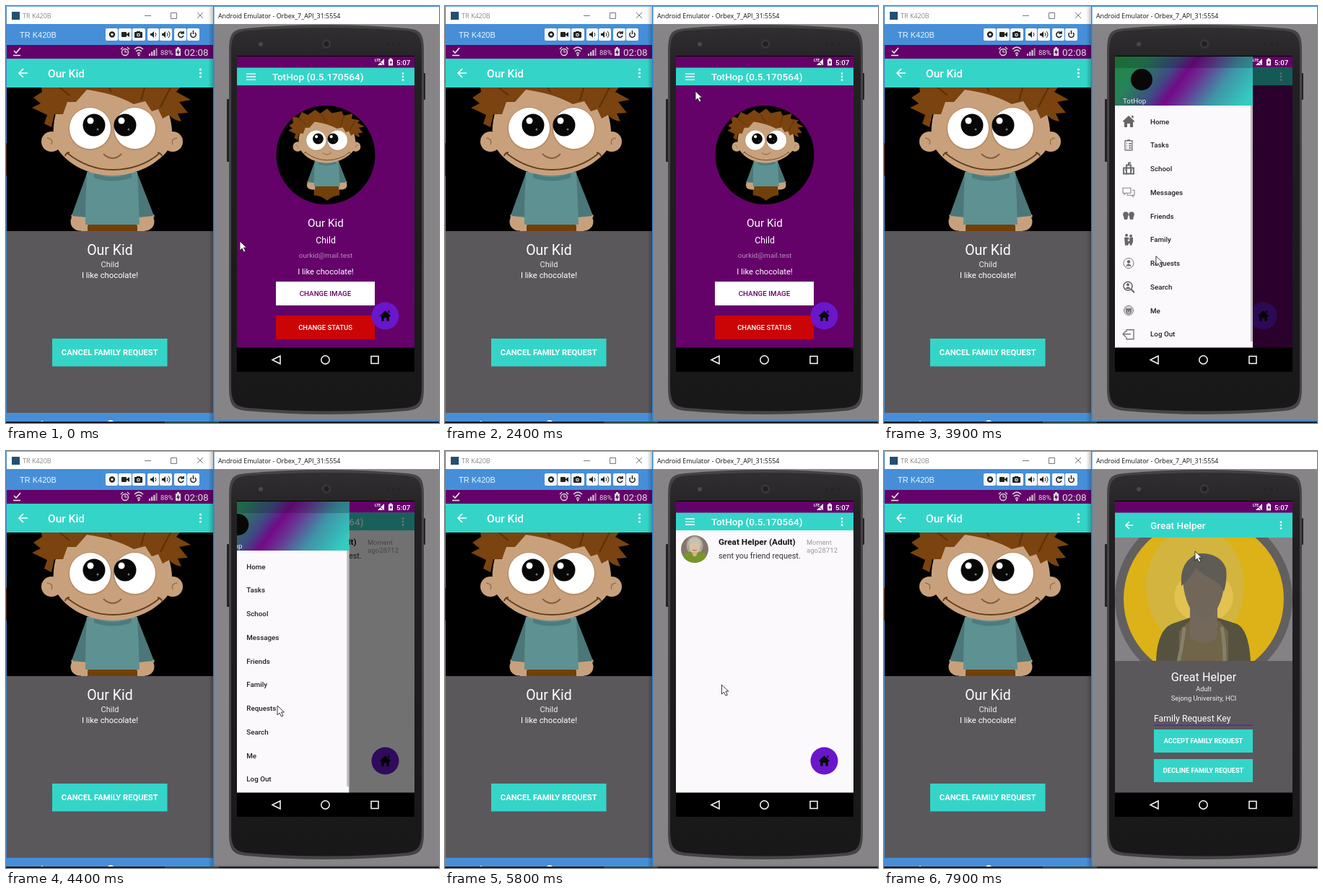
An HTML page that plays this animation: 600x578 px, repeating every 8000 ms.

```html
<!DOCTYPE html>
<html lang="en">
<head>
<meta charset="utf-8">
<title>Family request</title>
<style>
html, body { margin: 0; width: 100%; height: 100%; overflow: hidden; background: #878487; }
svg { display: block; width: 600px; height: 578px; }
text { font-family: Roboto, "Open Sans", sans-serif; white-space: pre; }
.win { font-family: "Open Sans", "Noto Sans", sans-serif; }
.ln { fill: none; stroke-linecap: butt; }
</style>
</head>
<body>
<svg id="stage" viewBox="0 0 600 578"></svg>
<script>
const TEAL = '#34d5c8', PURPLE = '#640269', GREY = '#5b585c', PAPER = '#fbf9fc';
const KID = 'Our Kid', PARENT = 'Great Helper', APP = 'TotHop';

const rect = (x, y, w, h, fill, more = '') => `<rect x="${x}" y="${y}" width="${w}" height="${h}" fill="${fill}" ${more}/>`;
const disc = (x, y, r, fill, more = '') => `<circle cx="${x}" cy="${y}" r="${r}" fill="${fill}" ${more}/>`;
const oval = (x, y, rx, ry, fill) => `<ellipse cx="${x}" cy="${y}" rx="${rx}" ry="${ry}" fill="${fill}"/>`;
const area = (d, fill, more = '') => `<path d="${d}" fill="${fill}" ${more}/>`;
const line = (d, color, w = 1) => `<path class="ln" d="${d}" stroke="${color}" stroke-width="${w}"/>`;
const label = (s, x, y, size, fill = '#fff', more = '') => `<text x="${x}" y="${y}" font-size="${size}" fill="${fill}" ${more}>${s}</text>`;
const MID = 'text-anchor="middle"', MED = 'font-weight="500"', BOLD = 'font-weight="700"';
const group = (body, more = '') => `<g ${more}>${body}</g>`;
const at = (x, y, body) => group(body, `transform="translate(${x} ${y})"`);
const dots = (x, y, gap, r) => [-gap, 0, gap].map(d => disc(x, y + d, r, '#fff')).join('');
const button = (x, y, w, h, s, size, fill = TEAL, ink = '#fff', weight = BOLD) =>
  rect(x, y, w, h, fill) + label(s, x + w / 2, y + h / 2 + size * .36, size, ink, MID + ' ' + weight);
const back = (x, y, s) => line(`M${x + 6 * s} ${y}H${x - 5 * s}M${x} ${y - 6 * s}l${-6 * s} ${6 * s}l${6 * s} ${6 * s}`, '#fff', 1.7 * s);

function child() {
  const skin = '#c8a17c', hair = '#7a430f', ink = '#070707';
  const eye = (x, px) => disc(x, 170, 30, '#b58c67') + disc(x, 169.5, 28.5, '#fff') +
    disc(px, 165, 15.5, ink) + disc(px - 5, 159, 4.5, '#fff') + disc(px + 5, 171, 1.5, '#777');
  return rect(-5, 60, 300, 300, '#000') +
    area('M110 302H184V329Q168 328 148 344Q128 328 110 329Z', '#714009') +
    area('M112 232L90 293L112 300ZM182 232L206 293L184 300Z', '#4a777a') +
    disc(102, 299, 12.5, skin) + disc(193, 299, 12.5, skin) +
    area('M90 290L113 281V312H104ZM182 281L206 290L192 312H182Z', skin) +
    area('M112 234L92 291L113 293ZM182 234L204 291L183 293Z', '#4b7779') +
    area('M112 230H182Q184 270 185 303H110Q110 270 112 230Z', '#5e9192') +
    area('M122 231Q147 243 174 231V238Q147 247 122 238Z', '#4d7b7e') +
    disc(63, 188, 14, skin) + disc(231, 188, 14, skin) +
    line('M57 183q9 1 6 9M237 183q-9 1-6 9', '#97714f', 1.5) +
    area('M92 105C67 135 61 172 69 194C84 221 117 235 147 235C179 235 211 220 228 195C234 172 228 135 200 105Z', skin) +
    area('M38 127L50 119L46 98L66 105L75 87L92 96L114 81L128 92L148 78L162 91L190 85L196 98L222 92L219 107L242 112L236 119L256 130L240 133L252 148L238 149L243 160Q231 158 226 151L217 156L211 143L202 146L193 132L177 136Q150 121 112 116L97 133L85 133L79 150L67 150L63 168L53 163L57 151L36 141L48 135Z', hair) +
    line('M66 106l22 18M132 94l14 25M196 100l-9 31M228 113l-14 27', '#5b3008', 2) +
    eye(116.5, 122) + eye(178.5, 165) +
    line('M135 205Q148 217 160 205', '#85603f', 2) +
    line('M85 204Q114 227 148 227Q186 227 213 204M82 208q1-5 6-5M210 203q5 1 6 5', '#62401f', 1.8);
}

const house = c => area('M0-8L8.5 0L6 1V8H2V3H-2V8H-6V1L-8.5 0ZM4-8H6.5V-4L4-6Z', c);
const fab = at(525.5, 429.5, disc(0, 0, 19, '#6a16cc') + group(house('#080808'), 'transform="scale(.9)"'));

const menu = [
  ['Home', house('#666')],
  ['Tasks', line('M-5-6H5V7H-5ZM-2-7H2M-3-2H-2M0-2H4M-3 1H-2M0 1H4M-3 4H-2M0 4H4', '#777', 1.3)],
  ['School', line('M-7 7V-1H7V7ZM-3 7V-5H3V7M-5 2H-4M4 2H5M0-5V-8H3M-8 7H8', '#666', 1.8)],
  ['Messages', line('M-8-6H3V1H-4L-6 3V1H-8ZM5-3H8V4H6V6L4 4H-2V2', '#888', 1.1)],
  ['Friends', disc(-4, -2, 3.8, '#666') + disc(4, -2, 3.8, '#666') + area('M-7 1H-1L-2 5H-6ZM1 1H7L6 5H2Z', '#666')],
  ['Family', disc(-3, -6, 2, '#666') + disc(3, -5, 2, '#666') + area('M-6-3H0L1 0L2-3H6V3L4 8H2L1 4L-1 8H-5Z', '#666') + disc(0, 1, 1.4, '#eee')],
  ['Requests', disc(0, 0, 7, 'none', 'stroke="#777"') + disc(0, -2, 2.2, '#666') + area('M-4 4Q0-2 4 4Z', '#666')],
  ['Search', disc(-1, -1, 6, 'none', 'stroke="#666" stroke-width="1.5"') + disc(-1, -3, 2, '#666') + area('M-5 3Q-1-3 3 3Z', '#666') + line('M3 3L8 8', '#666', 2)],
  ['Me', disc(0, 0, 6.5, '#ddd', 'stroke="#777"') + disc(0, 1, 4, '#777') + area('M-4-4L-1-2H1L4-4V0H-4Z', '#777') + line('M-2 1H-1M1 1H2M-2 3H2', '#eee')],
  ['Log Out', line('M-3-3V-6H7V7H-3V4M3 0H-8M-4-4L-8 0L-4 4', '#777', 1.4)]
];

function leftWindow() {
  const tool = (x, w) => rect(x, 31, w, 17, '#f8f9fb', 'rx="2"');
  const speaker = (x, waves) => area(`M${x - 4} 38h2l3-3v9l-3-3h-2z`, '#222') + line(waves, '#222');
  return rect(0, 0, 288, 578, '#fff') +
    rect(8, 8, 11, 11, '#234f72') + label('TR K420B', 23, 16.5, 9, '#888', 'class="win"') +
    line('M192 13.5H201M228.5 9.5H236.5V17.5H228.5ZM265 9L273 17M273 9L265 17', '#777') +
    rect(0, 25, 288, 29, '#468fd8') +
    label('TR K420B', 19, 44, 11, '#eef6ff', 'style="font-family:\'Liberation Sans\',sans-serif"') +
    [[138, 17], [156, 18], [175, 18], [196, 16], [213, 17], [233, 17], [251, 17]].map(b => tool(...b)).join('') +
    disc(147, 39.5, 3, 'none', 'stroke="#222" stroke-width="2.4"') +
    rect(160, 36, 7, 7, '#222', 'rx="1"') + area('M167 39L171 36V43L167 40Z', '#222') +
    rect(178, 36, 11, 8, '#222', 'rx="1"') + rect(181, 35, 5, 2, '#222') + disc(183.5, 40, 2.3, '#fff') + disc(183.5, 40, 1.2, '#222') +
    speaker(204, 'M207 37q2 2.5 0 5') + speaker(220, 'M223 37q2 2.5 0 5M225 35q4 4.5 0 9') +
    line('M245 37A3.7 3.7 0 1 0 246 41M246 35V38H242', '#222', 1.6) +
    line('M257 37A3.7 3.7 0 1 0 262 37M259.5 34V39', '#222', 1.5) +
    rect(0, 54, 288, 19, PURPLE) + line('M11 62L14 65L20 58M10 68.5H20', '#eee', 1.6) +
    disc(165, 64, 4.5, 'none', 'stroke="#ddd" stroke-width="1.3"') + line('M165 61V64H168M159 60L162 57M168 57L171 60', '#ddd', 1.2) +
    line('M178 60Q184 54 190 60M180 63Q184 59 188 63M182 66Q184 64 186 66', '#ddd', 1.5) + area('M182 67H186L184 70Z', '#ddd') +
    [0, 1, 2, 3].map(i => rect(198 + i * 3.2, 66 - i * 2.5, 2, 3 + i * 2.5, i < 3 ? '#ddd' : '#b58ab8')).join('') +
    label('88%', 214, 67.5, 9.5, '#ddd') + rect(235, 59, 7, 10, '#ddd') + rect(237, 57, 3, 2, '#ddd') + area('M239 60L236 65H238V68L241 63H239Z', PURPLE) +
    label('02:08', 247, 68.5, 13.5, '#ddd') +
    rect(0, 73, 288, 40, TEAL) + back(24, 93, 1) + label(KID, 58, 99, 15.5, '#fff', MED) + dots(269.5, 93, 5, 1.6) +
    group(child(), 'clip-path="url(#photo)"') +
    rect(0, 312, 288, 252, GREY) +
    label(KID, 144, 345, 19.5, '#fff', MID) + label('Child', 144, 361.5, 11, '#eee', MID) + label('I like chocolate!', 144, 377, 11.3, '#fff', MID) +
    button(64, 461, 159.5, 38.5, 'CANCEL FAMILY REQUEST', 11.2) +
    rect(0, 564, 288, 12, '#468fd8') + disc(145, 579, 5, '#fff') + rect(49, 575, 2, 2, '#fff') +
    rect(0, 576, 600, 2, '#141821') + rect(220, 576, 75, 2, '#27463f') +
    rect(280, 0, 8, 576, 'url(#shade)') + rect(0, 0, 1, 564, '#4b87bd') + rect(0, 190, 1, 45, '#5a3418') + rect(0, 0, 288, 1, '#6fa9d8');
}

function phone() {
  return rect(288, 0, 312, 575, '#878487') + rect(288, 0, 312, 25, '#fff') +
    label('Android Emulator - Orbex_7_API_31:5554', 294, 16.5, 8.9, '#111', 'class="win"') +
    rect(287, 0, 1.5, 575, '#2c83d6') + rect(288, 0, 312, 1, '#2c83d6') + rect(288, 574, 312, 1, '#2c83d6') +
    rect(306, 129, 5, 87, '#242224', 'rx="1"') + rect(577, 93, 4, 37, '#242224', 'rx="1"') +
    area('M309 64C309 38 313 33 332 31Q444 21 556 31C575 33 579 38 579 64V528C579 553 574 559 556 561Q444 571 332 561C314 559 309 553 309 528Z', '#454345') +
    area('M312 66C312 42 316 36 334 34Q444 26 554 34C572 36 576 42 576 66V526C576 549 571 555 554 557Q444 566 334 557C317 555 312 549 312 526Z', 'url(#body)') +
    disc(444, 52.5, 6.5, '#383638') + disc(444, 52.5, 3.5, '#201f21') + disc(353, 53, 3, '#4a484a') +
    [529, 537, 545].map(x => disc(x, 53, 2, '#272527')).join('') +
    rect(320, 69, 246, 438, '#000');
}

const appBar = (title, h, icon) => {
  const y = h > 30 ? 103 : 98;
  return rect(320, 85, 246, h, TEAL) + icon(y) + label(title, 369, y + 5, 13.6, '#fff', MED) + dots(550, y, 4.4, 1.4);
};
const burger = y => line(`M333 ${y - 4}H346M333 ${y}H346M333 ${y + 4}H346`, '#fff', 1.3);

const home = rect(320, 110, 246, 364, PURPLE) + appBar(APP + ' (0.5.170564)', 25, burger) +
  group(group(child(), 'transform="translate(443 206.5) scale(.479) translate(-144 -212)"'), 'clip-path="url(#round)"') +
  label(KID, 443, 306, 15.3, '#fff', MID) + label('Child', 443, 329, 12.3, '#fff', MID) +
  label('ourkid@mail.test', 443, 349, 9.9, '#b58db8', MID) + label('I like chocolate!', 443, 372, 11.2, '#fff', MID) +
  button(374, 382, 137, 33, 'CHANGE IMAGE', 9.8, '#fff', PURPLE, MED) +
  button(374, 429, 137, 33, 'CHANGE STATUS', 9.5, '#cb0505', '#fff', MED) + fab;

const list = rect(320, 110, 246, 364, PAPER) + appBar(APP + ' (0.5.170564)', 25, burger) +
  group(disc(346, 136, 17.5, '#e8ba22') + oval(346, 131, 5.5, 7.5, '#fff') + area('M334 148Q335 141 346 139Q357 141 358 148Q346 157 334 148Z', '#fff'), 'id="blank"') +
  group(disc(346, 136, 19, '#87756b') + oval(346, 131, 11.5, 13, '#aaa89b') + area('M329 144Q346 134 363 144Q358 155 346 155Q334 155 329 144Z', '#789527') +
    oval(346, 133, 7.5, 9.5, '#dcc0a2') + area('M337 130Q338 120 346 120Q355 121 355 132Q350 128 348 124Q344 130 337 130Z', '#c3c1b4') +
    area('M342 140H350L348 146H344Z', '#d0b193') + line('M343 137Q346 139 349 137', '#a75b55'), 'id="face"') +
  label(PARENT + ' (Adult)', 379, 130, 11.8, '#141414', BOLD) + label('sent you friend request.', 379, 149, 10.9, '#333') +
  label('Moment', 501, 130, 9.3, '#999') + label('ago28712', 501, 141, 9.6, '#999') + fab;

const profile = rect(320, 110, 246, 364, GREY) + rect(320, 120, 246, 171, '#858286') +
  group(group(disc(443, 205, 123, '#625f60') + disc(443, 205, 111, '#dcb218') + oval(431, 188, 68, 83, '#d3b43e') +
    oval(443, 202, 41, 36, '#e2c250') +
    area('M377 292Q378 250 398 240L424 231Q443 243 462 231L490 240Q506 250 508 292Z', '#55533f') +
    area('M409 292V250L424 235Q443 262 464 235L477 250V292Z', '#706549') +
    line('M416 244Q414 268 408 292M468 244Q472 264 472 292', '#858067', 5) +
    area('M424 218H462V258Q443 274 424 258Z', '#74685a') +
    area('M414 180Q413 151 443 143Q473 149 472 181Q468 225 443 235Q418 225 414 180Z', '#706659') +
    area('M412 187Q409 151 437 142Q466 141 474 163Q476 178 471 195Q469 187 458 180Q444 173 432 162Q424 177 412 187Z', '#5f5c55'),
    'id="portrait"'), 'clip-path="url(#cover)"') +
  appBar(PARENT, 35, y => back(340, y, .85)) +
  label(PARENT, 443, 318.5, 16.2, '#fff', MID) + label('Adult', 443, 333, 9.3, '#eee', MID) + label('Sejong University, HCI', 443, 346, 9.4, '#eee', MID) +
  label('Family Request Key', 374, 375, 12.3) + rect(374, 379.5, 137, 1.5, '#6b16c8') +
  button(374, 386, 137, 32, 'ACCEPT FAMILY REQUEST', 9.2) + button(374, 427, 137, 32, 'DECLINE FAMILY REQUEST', 9.2);

const drawer = rect(320, 70, 191, 404, PAPER) + rect(320, 70, 191, 68, 'url(#header)') + rect(320, 70, 191, 16, '#0003') +
  disc(357, 102, 15, '#080808') + label(APP, 331, 135, 9.8, '#eee') +
  menu.map(([name, icon], i) => {
    const y = 160 + i * 32.75;
    return at(339, y, icon) + label(name, 369, y + 3.5, 9.8, '#222', MED);
  }).join('') + rect(508, 138, 3, 327, '#bdbabd');

const status = rect(320, 70, 246, 15.5, PURPLE) +
  label('LTE', 511, 77, 5, '#fff', BOLD) + area('M524 73V82H515Z', '#fff') + line('M519 78l4 4', PURPLE, 1) +
  rect(530, 74, 6, 8.5, '#fff') + rect(531.5, 72.5, 3, 2, '#fff') + area('M533.5 75L531.5 79H533V82L535 77H533.5Z', PURPLE) +
  label('5:07', 541, 81.5, 9.8, '#fff', MED);

const nav = rect(320, 473.5, 246, 33.5, '#000') + line('M380 485V496L369 490.5Z', '#fff', 1.5) +
  disc(442.5, 490.5, 5.7, 'none', 'stroke="#fff" stroke-width="1.5"') + line('M506 485.5H516V495.5H506Z', '#fff', 1.5);

const stop = (o, c) => `<stop offset="${o}" stop-color="${c}"/>`;
const clip = (id, shape) => `<clipPath id="${id}">${shape}</clipPath>`;
const stage = document.getElementById('stage');
stage.innerHTML = `<defs>
  <linearGradient id="shade">${stop(0, '#0000') + stop(1, '#0004')}</linearGradient>
  <linearGradient id="body" x2="0" y2="1">${stop(0, '#302e30') + stop(.12, '#222022') + stop(1, '#191819')}</linearGradient>
  <linearGradient id="header" gradientUnits="userSpaceOnUse" x1="320" y1="69" x2="476" y2="184">
  ${stop(0, '#1f8a3c') + stop(.2, '#268259') + stop(.38, '#3f4a83') + stop(.48, '#720a88') + stop(.56, '#6d2c92') + stop(.74, '#3f93a6') + stop(.95, '#32cdc1')}</linearGradient>
  ${clip('photo', rect(1, 113, 286, 199, '#000')) + clip('round', disc(443, 206.5, 68.5, '#000')) + clip('cover', rect(320, 120, 246, 171, '#000')) + clip('screen', rect(320, 69, 246, 438, '#000'))}
  </defs>` + leftWindow() + phone() +
  group(group(home, 'id="home"') + group(list, 'id="list"') + group(profile, 'id="profile"') +
    status + rect(320, 85.5, 246, 388.5, '#000', 'id="scrim"') + group(drawer, 'id="drawer"') + nav, 'clip-path="url(#screen)"') +
  area('M0 0V13L3 10L5.5 15L8 14L5.5 9H9.5Z', '#fff', 'id="cursor" stroke="#222" stroke-width=".9"');

const part = Object.fromEntries([...stage.querySelectorAll('g[id], rect[id], path[id]')].map(e => [e.id, e]));
const clamp = v => Math.max(0, Math.min(1, v));
const ramp = (t, a, b) => clamp((t - a) / (b - a));
const easeOut = u => 1 - (1 - u) ** 3;
const smooth = u => u * u * (3 - 2 * u);
const show = (name, on) => part[name].setAttribute('opacity', Number(on));

// time, x, y
const track = [[0, 324, 326], [1100, 324, 326], [2200, 347, 118], [2400, 347, 118], [2700, 344, 98], [3050, 344, 98],
  [3800, 377, 346], [4300, 376, 353], [5500, 376, 353], [6800, 431, 139], [8000, 431, 139]];

function draw(t) {
  const i = track.findIndex(k => k[0] > t);
  const [a, x, y] = track[i - 1], [b, x2, y2] = track[i];
  const u = smooth(ramp(t, a, b));
  part.cursor.setAttribute('transform', `translate(${x + (x2 - x) * u} ${y + (y2 - y) * u})`);

  const open = easeOut(ramp(t, 2800, 3125)) * (1 - easeOut(ramp(t, 4380, 4680)));
  part.drawer.setAttribute('transform', `translate(${191 * (open - 1)} 0)`);
  show('scrim', .58 * ramp(t, 2800, 3070) * (1 - ramp(t, 4380, 4720)));

  show('home', t < 4400);
  show('list', t >= 4400 && t < 7500);
  show('blank', t < 5100);
  show('face', t >= 5100);
  show('profile', t >= 7500);
  show('portrait', ramp(t, 7500, 7800));
}

function tick() {
  draw(Math.floor(performance.now() % 8000 / 100) * 100);
  requestAnimationFrame(tick);
}
tick();
</script>
</body>
</html>
```
